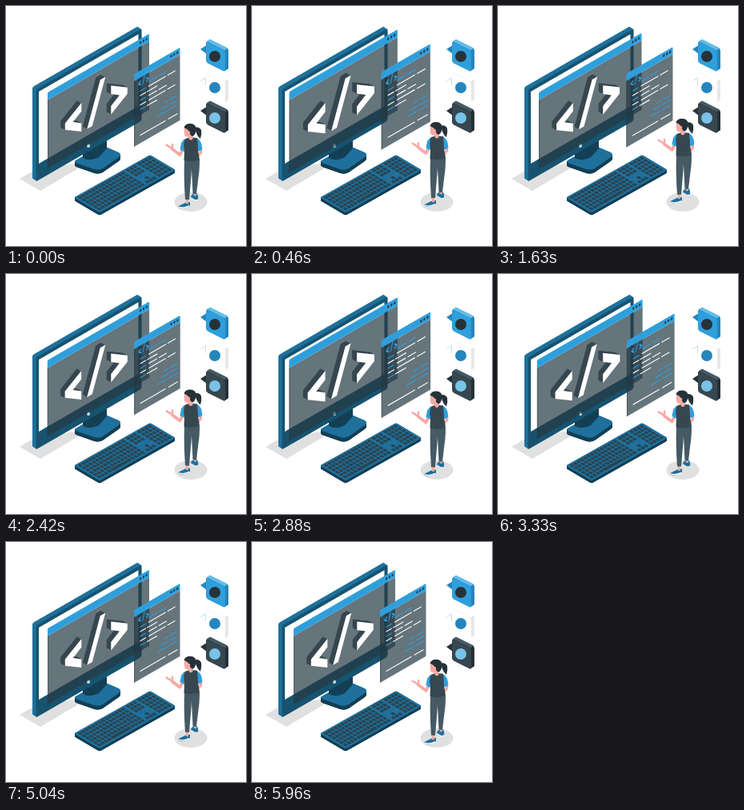
An HTML page with a canvas that plays this animation: 300x300 px, repeating every 6 s.

```html
<!DOCTYPE html>
<html lang="en">
<head>
<meta charset="utf-8">
<title>Web development</title>
<style>
  html, body { margin: 0; width: 100%; height: 100%; overflow: hidden; background: #fff; }
  canvas { display: block; width: 100vw; height: 100vh; }
</style>
</head>
<body>
<canvas id="stage"></canvas>
<script>
const canvas = document.getElementById('stage');
const ctx = canvas.getContext('2d');
const ISO = 0.577;
const C = {
  light: '#2f9fdc', blue: '#1f709c', deep: '#17536f', dark: '#133f55', ink: '#263238',
  slate: '#37474f', pants: '#455a64', skin: '#f7a9a4', shade: '#e0e0e0',
  glass: 'rgba(38,58,68,.7)'
};

function shape(d, fill) {
  ctx.fillStyle = fill;
  ctx.fill(new Path2D(d));
}

function line(d, color, width) {
  ctx.lineCap = ctx.lineJoin = 'round';
  ctx.lineWidth = width;
  ctx.strokeStyle = color;
  ctx.stroke(new Path2D(d));
}

function oval(x, y, rx, ry, fill) {
  ctx.beginPath();
  ctx.ellipse(x, y, rx, ry, 0, 0, Math.PI * 2);
  ctx.fillStyle = fill;
  ctx.fill();
}

function box(x, y, w, h, fill, r = 0) {
  ctx.beginPath();
  ctx.roundRect(x, y, w, h, r);
  ctx.fillStyle = fill;
  ctx.fill();
}

// Runs paint in a plane at (x, y) spanned by (1, slope) and (shear, fall).
function plane(x, y, slope, paint, shear = 0, fall = 1) {
  ctx.save();
  ctx.transform(1, slope, shear, fall, x, y);
  paint();
  ctx.restore();
}
const wall = (x, y, paint) => plane(x, y, -ISO, paint);

// Repeats paint along a depth vector, ending at its front.
function extrude(dx, dy, paint) {
  for (let i = 12; i > 0; i--) {
    ctx.save();
    ctx.translate(dx * i / 12, dy * i / 12);
    paint();
    ctx.restore();
  }
}

function monitor() {
  shape('M17 216L34 206L90 196L92 202L43 231Z', C.shade);
  const plate = 'M87 193L120 174L141 183Q145 186 141 189L121 203Q116 206 110 204L90 197Q84 195 87 193Z';
  extrude(0, 5, () => shape(plate, C.dark));
  shape(plate, C.blue);
  shape('M96 178L126 161L126 178L116 189Q106 195 96 190Z', C.dark);

  extrude(-4.5, -3, () => wall(37.5, 104.5, () => box(0, 0, 132, 115, C.blue, 2)));
  wall(37.5, 104.5, () => {
    box(0, 0, 132, 115, C.deep, 2);
    box(3.5, 4.5, 124.5, 90, '#fff');
  });
  oval(103, 174.5, 2, 2.5, '#c5e3f4');
}

function bracket(dir, fill) {
  ctx.save();
  ctx.scale(dir, 1);
  shape('M-10-18V-7.5L.5 0L-10 7.5V18L10.5 4V-4Z', fill);
  ctx.restore();
}

function tag(fill) {
  for (const dir of [-1, 1]) {
    ctx.save();
    ctx.translate(dir * 28.5, 0);
    bracket(dir, fill);
    ctx.restore();
  }
  shape('M5-33H11.5L-5 19H-11.5Z', fill);
}

function pane(w, h, bar) {
  box(0, bar, w, h - bar, C.glass);
  box(0, bar, 1.2, h - bar, 'rgba(38,50,56,.3)');
  box(0, 0, w, bar, C.light, [1.5, 1.5, 0, 0]);
  for (let i = 0; i < 3; i++) oval(w - 11 + i * 3.8, bar / 2, 1.1, 1.5, C.ink);
}

function bigWindow() {
  pane(127, 95, 9.5);
  ctx.translate(60.8, 55.3);
  extrude(-5.5, -6, () => tag(C.slate));
  tag('#fff');
}

function smallWindow() {
  pane(57.5, 91, 9);
  ctx.save();
  ctx.translate(12, 16);
  ctx.scale(0.17, 0.2);
  tag(C.light);
  ctx.restore();

  const dash = (from, to, v, color) => line(`M${from} ${v}H${to}`, color, 1.25);
  for (let r = 0; r < 6; r++) {
    const v = 20 + r * 5.8;
    const end = 37 + 13 * Math.sin(r * 2.1);
    if (r) dash(8, 14.5, v, r % 2 ? C.light : '#fff');
    dash(18.5, end - 9, v, r ? '#fff' : C.light);
    dash(end - 6, end + 3, v, r ? '#fff' : C.light);
  }
  for (let r = 0; r < 3; r++) {
    dash(38 - r * 4, 43 - r, 58 + r * 6, C.light);
    dash(46 - r, 54, 58 + r * 6, C.light);
  }
  dash(8, 39, 81, '#fff');
  dash(43, 54, 81, '#fff');
}

function keyboard() {
  const deck = (y, paint) => plane(85, y, -0.563, paint, 0.86, 0.51);
  const body = fill => () => box(0, 0, 95, 37, fill, 2);
  extrude(0, 3.5, () => deck(239.5, body(C.dark)));
  deck(239.5, () => {
    body(C.blue)();
    for (let r = 0; r < 6; r++) {
      for (let i = 0; i < 21; i++) {
        // gaps part the letters, arrows and number pad
        const gap = (i > 13) + (i > 16);
        const arrows = i > 13 && i < 17;
        if (arrows && (r === 3 || (r === 4 && i !== 15))) continue;
        const space = r === 5 && i > 3 && i < 9;
        box(2.5 + i * 4.15 + gap * 2, 2 + r * 5.6, space ? 4.2 : 3.2, 4.3, '#29434f', 0.5);
      }
    }
  });
}

// Speech tile: thick rounded slab with a pointer on its left.
function tile(y, face, side, top, mark) {
  shape(`M250 ${y + 8.5}L243 ${y + 13}L251 ${y + 19}Z`, side);
  extrude(4, -2.5, () => plane(250, y + 3, 0.5, () => box(0, 0, 24, 26, side, 2.5)));
  shape(`M251 ${y + 3}L255 ${y + 0.5}L277 ${y + 11.5}L273.5 ${y + 14.5}Z`, top);
  plane(250, y + 3, 0.5, () => box(0, 0, 24, 26.5, face, 2.5));
  oval(261, y + 22, 7, 7, mark);
}

function icons() {
  tile(41, C.light, '#2485bb', '#63bce9', C.ink);
  tile(80, '#fff', '#e8e8e8', '#fff', '#2585bd');
  shape('M250 88L242 93L251 100Z', '#fff');
  line('M249.5 90L243.5 93.3M249.5 90V98.5', '#b5d8ea', 0.8);
  tile(118, C.slate, C.ink, '#455a64', '#79c3e8');
}

function person() {
  // shoes
  shape('M232 236L238 234Q241 237 240 241Q238 244 235 242L231 239Z', C.blue);
  line('M232 240L236 242.5H239', '#fff', 1);
  shape('M224 246L230 245V250Q225 253 220 253Q215 253 216 250Z', C.blue);
  line('M216.8 251.5Q222 253.5 229 250', '#fff', 1.4);
  // legs
  line('M226.5 240V246M236 232L236.5 236', C.skin, 3);
  shape('M223 192H232.5L231.5 212L229 242H224Q222 215 223 192Z', C.pants);
  shape('M231 192H242Q242 206 240.5 214L238 235H233.5L232.5 214Z', C.pants);
  // arms
  line('M243 177L243.5 183L239.5 188', C.skin, 3.6);
  line('M221.5 178L217.5 186L208 179', C.skin, 3.8);
  line('M209 179.5L204 175.5M207 178L200.5 173.8M208 178L208 173', C.skin, 2.3);
  // shirt and vest
  shape('M223 166L219 171L217.5 179Q220 182 224 182L226 170Z', C.light);
  shape('M238 165Q243 167 244.5 173L245.5 179Q243 182 239 181L236 169Z', C.light);
  shape('M224 166L230 164L239 165Q240 174 240 180L242 192Q233 196 222.5 193L223 180Q221 172 224 166Z', C.slate);
  // head
  line('M230 161L231 165', C.skin, 5);
  shape('M223 152Q222 158 223.5 162Q225 164.5 229 163L233 159L231 150Z', C.skin);
  shape('M222.5 152Q224 147 230 147Q236 147 237.5 152Q238 160 233.5 163Q230 162 229.5 158Q228 154 222.5 152Z', C.ink);
  shape('M236 152Q241 150 244 155Q245 160 243 166Q239 163 237 156Z', C.ink);
  oval(229, 158, 1.2, 1.6, C.skin);
}

// Straight rise to 1 at peak, then a straight fall.
const pulse = (t, peak, rise, fall) =>
  Math.max(0, 1 - (t < peak ? (peak - t) / rise : (t - peak) / fall));

function draw(t) {
  const ratio = window.devicePixelRatio || 1;
  const w = Math.round(innerWidth * ratio), h = Math.round(innerHeight * ratio);
  if (canvas.width !== w || canvas.height !== h) {
    canvas.width = w;
    canvas.height = h;
  }
  ctx.setTransform(w / 300, 0, 0, h / 300, 0, 0);
  ctx.fillStyle = '#fff';
  ctx.fillRect(0, 0, 300, 300);

  monitor();
  const zoom = 1 + 0.085 * (pulse(t, 600, 600, 1200) + pulse(t, 3000, 600, 600));
  ctx.save();
  ctx.translate(135, 119);
  ctx.scale(zoom, zoom);
  ctx.translate(-135, -119);
  wall(52, 108, bigWindow);
  wall(160, 85, smallWindow);
  ctx.restore();

  keyboard();
  icons();
  oval(231, 245, 20.5, 12, C.shade);
  ctx.save();
  ctx.translate(0, -6.8 * pulse(t % 3000, 1500, 1500, 1500));
  person();
  ctx.restore();
}

const start = performance.now();
function frame() {
  draw((performance.now() - start) % 6000);
  requestAnimationFrame(frame);
}
frame();
</script>
</body>
</html>
```
